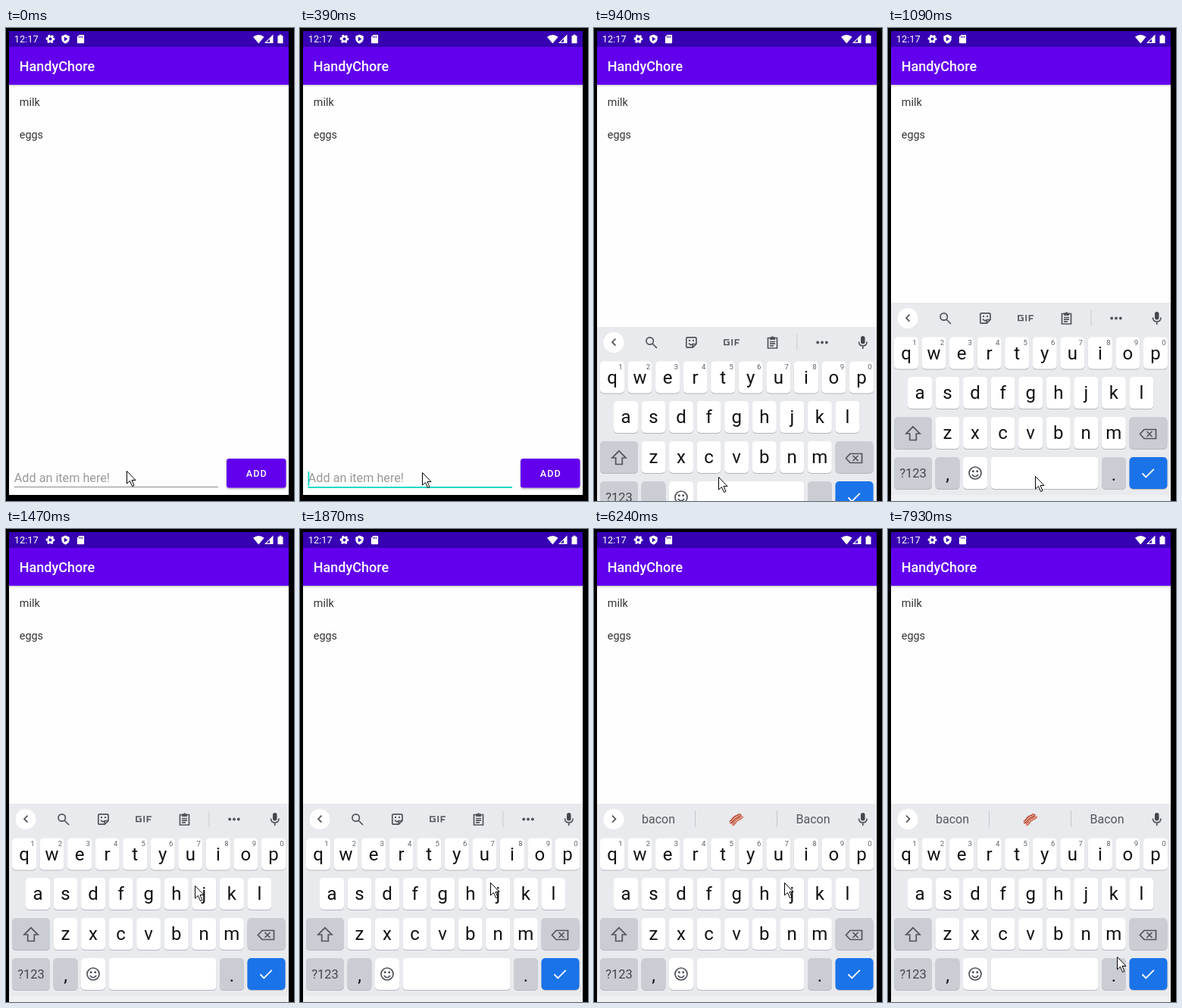
An HTML page for the animation above (8000 ms loop, 380 by 625 pixels).

```html
<!DOCTYPE html>
<html lang="en">
<head>
<meta charset="utf-8">
<title>Shopping list</title>
<style>
html, body { margin: 0; width: 100%; height: 100%; overflow: hidden; background: #000; }
svg { display: block; width: 380px; height: 625px; font-family: Roboto, sans-serif; }
.mid { text-anchor: middle; }
.item { font-size: 14.4px; fill: #333; }
.letter { font-size: 24px; fill: #111; text-anchor: middle; }
.digit { font-size: 9.6px; fill: #5f6368; text-anchor: middle; }
.word { font-size: 16px; fill: #55585c; text-anchor: middle; }
.line { fill: none; stroke: #50545a; stroke-width: 1.7; }
.form, .focus, .caret, .keyboard, .tools, .chips, .words, .pointer {
  animation: 8s step-end infinite;
}
.form { animation-name: form; }
.focus { animation-name: focus; }
.caret { animation-name: caret; }
.keyboard { animation-name: keyboard; }
.tools { animation-name: tools; }
.chips { animation-name: chips; }
.w1 { animation-name: w1; }
.w2 { animation-name: w2; }
.w3 { animation-name: w3; }
.w4 { animation-name: w4; }
.pointer { animation-name: pointer; }

@keyframes form { 0% { opacity: 1 } 10.25%, 100% { opacity: 0 } }
@keyframes focus { 0% { opacity: 0 } 3.375% { opacity: .6 } 4.875%, 100% { opacity: 1 } }
@keyframes caret { 0% { opacity: 0 } 4.875%, 100% { opacity: 1 } }
@keyframes keyboard {
  0% { opacity: 0; transform: translateY(32px) }
  11.75% { opacity: 1; transform: translateY(32px) }
  13.625%, 100% { opacity: 1; transform: none }
}
@keyframes tools { 0% { opacity: 1 } 71.75%, 100% { opacity: 0 } }
@keyframes chips { 0% { opacity: 0 } 71.75%, 100% { opacity: 1 } }
@keyframes w1 { 0% { opacity: 0 } 71.75% { opacity: 1 } 73.25%, 100% { opacity: 0 } }
@keyframes w2 { 0% { opacity: 0 } 73.25% { opacity: 1 } 74.75%, 100% { opacity: 0 } }
@keyframes w3 { 0% { opacity: 0 } 74.75% { opacity: 1 } 78%, 100% { opacity: 0 } }
@keyframes w4 { 0% { opacity: 0 } 78%, 100% { opacity: 1 } }
@keyframes pointer {
  0% { transform: translate(159px, 585px) }
  1.875% { transform: translate(161px, 587px) }
  11.75% { transform: translate(164px, 593px) }
  13.625% { transform: translate(194px, 592px) }
  15.125% { transform: translate(238px, 530px) }
  16.625% { transform: translate(253px, 474px) }
  18.375% { transform: translate(249px, 471px) }
  19.875% { transform: translate(251px, 468px) }
  21.5% { transform: translate(252px, 466px) }
  23.375% { transform: translate(251px, 467px) }
  92% { transform: translate(242px, 466px) }
  93.875% { transform: translate(226px, 463px) }
  95.75% { transform: translate(233px, 436px) }
  99.125%, 100% { transform: translate(302px, 565px) }
}
</style>
</head>
<body>
<svg viewBox="0 0 380 625">
  <defs>
    <linearGradient id="shade" x2="0" y2="1">
      <stop stop-color="#000" stop-opacity=".2"/><stop offset="1" stop-color="#000" stop-opacity="0"/>
    </linearGradient>
    <filter id="soft" x="-10%" y="-20%" width="120%" height="150%">
      <feDropShadow dx="0" dy="1.3" stdDeviation="1" flood-opacity=".35"/>
    </filter>
  </defs>
  <rect width="380" height="625"/>
  <rect x="4" y="4" width="369" height="613" fill="#fefefe"/>
  <rect x="4" y="75" width="369" height="3" fill="url(#shade)"/>
  <rect x="4" y="25" width="369" height="50" fill="#6200ee"/>
  <rect x="4" y="4" width="369" height="21" fill="#3700b3"/>

  <!-- status bar -->
  <g fill="#fff">
    <text x="10.8" y="19.2" font-size="12.8">12:17</text>
    <g fill="none" stroke="#fff">
      <circle cx="58.5" cy="14.5" r="3.2" stroke-width="2.5"/>
      <circle cx="58.5" cy="14.5" r="4.9" stroke-width="1.9" stroke-dasharray="2.8 2.33" transform="rotate(-16 58.5 14.5)"/>
    </g>
    <path d="M78.5 8.5l5.2 2.2v3.6c0 3-2.2 5.3-5.2 6.4c-3-1.1-5.2-3.4-5.2-6.4v-3.6z"/>
    <path d="M76.8 11.5v6l4.6-3z" fill="#3700b3"/>
    <path d="M96.5 9h5.6q1 0 1 1v9.200q0 1-1 1h-7.200q-1 0-1-1v-7.400z"/>
    <path d="M96.600 10.500v2.500m2-2.500v2.500m2-2.500v2.500" stroke="#3700b3" stroke-width=".9"/>
    <path d="M326 11.800q7.300-5.600 14.600 0l-7.300 8.700z"/>
    <path d="M352.500 8.500v11.500h-11.500z"/>
    <path d="M348 14.500v4.200h-4.200z" fill="#3700b3"/>
    <path d="M358.500 10.300h2v-1.500h3v1.500h2v10h-7z"/>
  </g>
  <text x="17.800" y="57.300" font-size="18" font-weight="500" fill="#fff">HandyChore</text>
  <text class="item" x="17.800" y="102.500">milk</text>
  <text class="item" x="17.800" y="145.500">eggs</text>

  <g class="form">
    <text x="10.800" y="600.300" font-size="16.200" fill="#999">Add an item here!</text>
    <rect x="10.500" y="606" width="269.500" height="1" fill="#8b8b8b"/>
    <rect class="focus" x="10.500" y="606" width="269.500" height="2" fill="#03dac5"/>
    <rect class="caret" x="10.500" y="586" width="1.800" height="19" fill="#03dac5"/>
    <rect x="291" y="569" width="78.500" height="38.500" rx="3.500" fill="#6200ee" filter="url(#soft)"/>
    <text class="mid" x="330.800" y="593.300" font-size="12.600" font-weight="500" letter-spacing="1.120" fill="#fff">ADD</text>
  </g>

  <g class="keyboard">
    <rect x="4" y="363" width="369" height="262" fill="#e8eaed"/>
    <rect x="4" y="617" width="369" height="8" fill="#eff0f2"/>
    <circle cx="26" cy="383.500" r="13.500" fill="#fff"/>

    <g class="tools">
      <path class="line" d="M28.500 378.700l-4.500 4.500l4.500 4.500"/>
      <circle class="line" cx="73.700" cy="381.500" r="4.700"/>
      <path class="line" d="M77 385l6 6" stroke-width="2"/>
      <path class="line" stroke-width="1.500" d="M123.500 376.800h9.800q1.700 0 1.700 1.700v7l-4.700 4.700h-6.800q-1.700 0-1.700-1.700v-10q0-1.700 1.700-1.700zM135 385.500h-4.700v4.700M125 384.500q2.500 3.500 5 1.500"/>
      <path d="M125 380h2v2h-2zm5 0h2v2h-2z" fill="#50545a"/>
      <path class="line" stroke-width="2" d="M178.500 380h-6.500v6.500h6v-3.500h-2.500M182.200 379v8.500M186.500 387.500v-7.500h5.500M186.500 384h4.500"/>
      <path class="line" stroke-width="1.500" d="M229.500 377.500h12v13.500h-12z"/>
      <path d="M232 376.500h2q1.500-3 3 0h2v3.500h-7z" fill="#50545a"/>
      <path class="line" stroke-width="1.400" d="M232 382.500h7m-7 2.700h7m-7 2.700h5"/>
      <path d="M268 373v21" stroke="#c9ccd0"/>
      <g fill="#50545a"><circle cx="295.200" cy="383.500" r="1.900"/><circle cx="301" cy="383.500" r="1.900"/><circle cx="306.800" cy="383.500" r="1.900"/></g>
    </g>

    <g class="chips">
      <path class="line" d="M24 378.700l4.500 4.500l-4.500 4.500"/>
      <path d="M133.500 372.500v21.500m108-21.500v21.500" stroke="#c4c7cb"/>
      <g class="words w1"><text class="word" x="85" y="389.300">ba</text><text class="word" x="187" y="389.300">back</text><text class="word" x="289" y="389.300">baby</text></g>
      <g class="words w2"><text class="word" x="85" y="389.300">bac</text><text class="word" x="187" y="389.300">back</text><text class="word" x="289" y="389.300">bacon</text></g>
      <g class="words w3"><text class="word" x="85" y="389.300">baco</text><text class="word" x="187" y="389.300">bacon</text><text class="word" x="289" y="389.300">taco</text></g>
      <g class="words w4">
        <text class="word" x="85" y="389.300">bacon</text>
        <g fill="none" stroke-linejoin="round">
          <path id="strip" d="M179 387.500q3-.5 4.500-3.500t5-4t4.500-3.500" stroke="#b5483a" stroke-width="4.200"/>
          <path d="M179 387.500q3-.5 4.500-3.500t5-4t4.500-3.500" stroke="#efb79a" stroke-width="1.300"/>
          <path d="M182 390.500q3-.5 4.500-3.500t5-4t4-3.500" stroke="#c65a45" stroke-width="3.400"/>
          <path d="M182 390.500q3-.5 4.500-3.500t5-4t4-3.500" stroke="#f0bd9f" stroke-width="1.100"/>
        </g>
        <text class="word" x="289" y="389.300">Bacon</text>
      </g>
    </g>
    <rect x="352" y="375" width="5.500" height="10.500" rx="2.750" fill="#43474c"/>
    <path class="line" d="M349.500 382.500q0 5.500 5.250 5.500t5.250-5.500M354.750 388v4"/>

    <g id="keys"></g>

    <path class="line" d="M33 526.800l9 9.200h-4.700v8.500h-8.600v-8.500h-4.700z" stroke-width="1.800"/>
    <path class="line" d="M338 530.500h15.500v12h-15.500l-5.500-6zM341.500 533l7 7m0-7l-7 7"/>
    <text class="mid" x="33" y="594" font-size="16.500" fill="#43474c">?123</text>
    <text class="letter" x="78.500" y="598">,</text>
    <text class="letter" x="298" y="598">.</text>
    <circle class="line" cx="115" cy="588" r="8"/>
    <path class="line" d="M110.800 590q4.200 5.500 8.400 0"/>
    <path d="M111 584.500h2.600v2.500h-2.600zm5.400 0h2.600v2.500h-2.600z" fill="#50545a"/>
    <path d="M335.500 588.500l4.800 4.800l10.500-10.500" fill="none" stroke="#fff" stroke-width="1.900"/>
  </g>

  <path class="pointer" d="M.5.500v16.500l4-3.500l3 7l2.500-1l-3-7h5z" fill="#fff" stroke="#000"/>
</svg>
<script>
const keys = document.getElementById('keys');
const pitch = 36.55;

function add(tag, attrs, text = '') {
  const node = document.createElementNS('http://www.w3.org/2000/svg', tag);
  for (const name in attrs) node.setAttribute(name, attrs[name]);
  node.textContent = text;
  keys.append(node);
}

function key(x, y, width, fill = '#fff') {
  add('rect', { x, y: y + 1, width, height: 42, rx: 5, fill: '#b3b6bc' });
  add('rect', { x, y, width, height: 42, rx: 5, fill });
}

function row(letters, left, top, numbered) {
  [...letters].forEach((letter, i) => {
    const x = left + i * pitch;
    key(x, top, 32);
    add('text', { class: 'letter', x: x + 16, y: top + 29 }, letter);
    if (numbered) add('text', { class: 'digit', x: x + 27, y: top + 10.5 }, (i + 1) % 10);
  });
}

row('qwertyuiop', 8, 408.5, true);
row('asdfghjkl', 26, 461, false);
row('zxcvbnm', 62.5, 514, false);

const grey = '#cbcdd4';
key(8, 514, 50, grey);
key(318.5, 514, 50, grey);
key(8, 567, 50, grey);
key(62.5, 567, 32, grey);
key(99, 567, 32);
key(135.5, 567, 142);
key(282, 567, 32, grey);
key(318.5, 567, 50, '#1a73e8');
</script>
</body>
</html>
```
